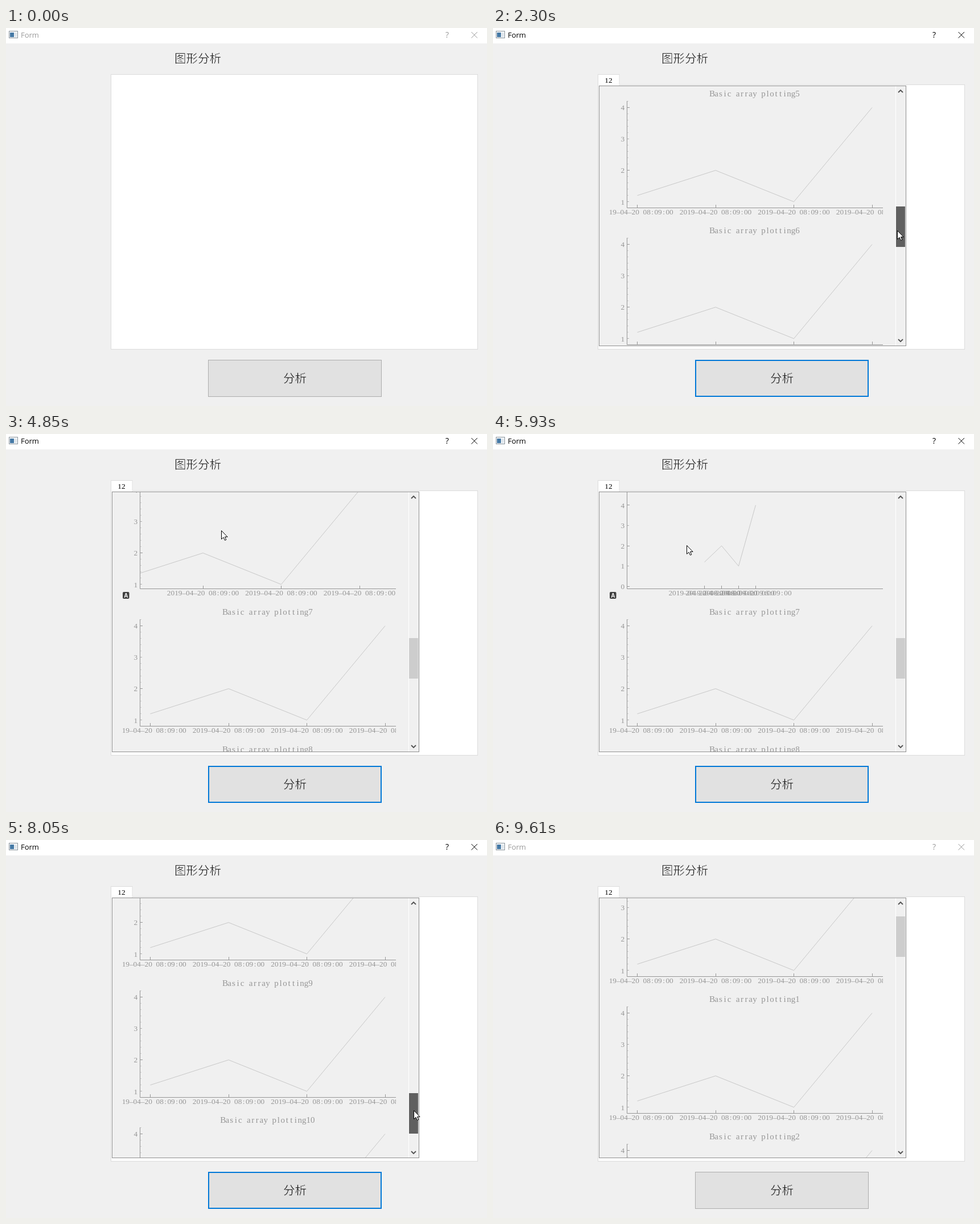
Write an HTML page with a canvas that moves like this. It is 845x663 px and loops after 9.68 s.

```html
<!DOCTYPE html>
<html lang="zh">
<head>
<meta charset="utf-8">
<title>Form</title>
<style>
html, body { margin: 0; width: 100%; height: 100%; overflow: hidden; background: #f0f0f0; }
canvas { display: block; width: 845px; height: 663px; }
</style>
</head>
<body>
<canvas id="stage" width="845" height="663"></canvas>
<script>
const ctx = document.getElementById('stage').getContext('2d');
const LOOP = 9680, STEP = 77;
const GRAY = '#969696', BACK = '#f0f0f0';
const SERIF = '"Liberation Serif", serif';
const SANS = '"Open Sans", "Noto Sans", sans-serif';
const CJK = '300 20.5px "Noto Sans CJK SC", "Noto Sans CJK", sans-serif';

// Where the mouse comes to rest or turns: time, x, y
const STOPS = [
  [120, 566, 660], [500, 540, 618], [930, 540, 618], [1770, 710, 164],
  [1850, 710, 164], [2310, 710, 355], [2690, 710, 400], [3180, 577, 202],
  [3542, 566, 276], [4300, 532, 205], [4620, 342, 165], [5090, 417, 173],
  [5929, 340, 195], [6170, 383, 190], [7260, 376, 205], [7830, 716, 388],
  [8008, 716, 474], [8200, 722, 497], [8600, 729, 164.4], [8885, 737, 664]
];

// Spans of time with a mouse button held
const SCROLL_DOWN = [1850, 2690], SCROLL_UP = [7830, 8600];
const PAN = [3180, 4300], ZOOM = [5090, 7260];

const DATA = [1.2, 2, 1, 4];
const STAMP = '2019–04–20 08:09:00';
const X0 = 253.5, DX = 137.5, UNIT = 55.1;

function pointer(t) {
  const i = STOPS.findIndex(s => s[0] > t);
  if (i === 0) return STOPS[0].slice(1);
  if (i < 0) return STOPS[STOPS.length - 1].slice(1);
  const [ta, xa, ya] = STOPS[i - 1], [tb, xb, yb] = STOPS[i];
  const u = (1 - Math.cos(Math.PI * (t - ta) / (tb - ta))) / 2;
  return [xa + (xb - xa) * u, ya + (yb - ya) * u];
}

// Distance the mouse has been dragged within a span
function drag([from, to], t) {
  const a = pointer(from);
  const b = pointer(Math.min(Math.max(t, from), to));
  return [b[0] - a[0], b[1] - a[1]];
}

const within = ([from, to], t) => t >= from - STEP && t < to + STEP;

// The dragged plot: pan by the distance, then scale about the grab point
function viewAt(t, y4) {
  const [px, py] = drag(PAN, t), [zx, zy] = drag(ZOOM, t);
  const [cx, cy] = pointer(ZOOM[0]);
  const sx = 1.02 ** zx, sy = 1.02 ** -zy;
  return {
    x0: cx + (X0 + px - cx) * sx, dx: DX * sx,
    y4: cy + (y4 + py - cy) * sy, unit: UNIT * sy
  };
}

function fill(x, y, w, h, color) {
  ctx.fillStyle = color;
  ctx.fillRect(x, y, w, h);
}

function path(points, color, width = 1) {
  ctx.strokeStyle = color;
  ctx.lineWidth = width;
  ctx.beginPath();
  points.forEach(([x, y]) => ctx.lineTo(x, y));
  ctx.stroke();
}

function frame(x, y, w, h, back, border, width = 1) {
  fill(x, y, w, h, back);
  ctx.strokeStyle = border;
  ctx.lineWidth = width;
  ctx.strokeRect(x + width / 2, y + width / 2, w - width, h - width);
}

function clip(x, y, w, h) {
  ctx.save();
  ctx.beginPath();
  ctx.rect(x, y, w, h);
  ctx.clip();
}

function label(str, x, y, font, color, align = 'left') {
  ctx.font = font;
  ctx.fillStyle = color;
  ctx.textAlign = align;
  ctx.fillText(str, x, y);
}

// Chinese text, thinned by an outline in the colour behind it
function thin(str, x, y, back) {
  label(str, x, y, CJK, '#000');
  ctx.strokeStyle = back;
  ctx.lineWidth = 0.6;
  ctx.strokeText(str, x, y);
}

// Half-em monospaced text, centred on x and y
function mono(str, x, y, size, color) {
  const cell = size / 2;
  const left = x - (str.length - 1) * cell / 2;
  [...str].forEach((c, i) =>
    label(c, left + i * cell, y + size * 0.32, size + 'px ' + SERIF, color, 'center'));
}

function drawTitleBar(active) {
  const ink = active ? '#000' : '#999';
  fill(0, 0, 845, 27, '#fff');
  frame(5, 5, 16, 13, '#f4f6f8', '#8a949c');
  fill(7, 8, 7, 8, '#4579a5');
  fill(15, 8, 4, 8, '#dfe6ec');
  label('Form', 26, 17, '13px ' + SANS, ink);
  label('?', 775, 17, '14px ' + SANS, ink, 'center');
  path([[817.5, 7], [828, 17.5]], ink);
  path([[828, 7], [817.5, 17.5]], ink);
}

function drawButton(t, active, x, y) {
  const over = t >= 120 && t < 8800 && x > 355 && x < 660 && y > 583 && y < 647;
  let look = ['#e1e1e1', '#adadad', 1];
  if (active) look = ['#e1e1e1', '#0078d7', 2];
  if (over) look = ['#e5f1fb', '#0078d7', active ? 2 : 1];
  if (t >= 350 && t < 500) look = ['#cce4f7', '#005499', 1];
  frame(355, 582, 305, 65, ...look);
  thin('分析', 487, 622, look[0]);
}

function drawPlot(i, top, { x0, dx, y4, unit }) {
  const roof = top + 13, floor = top + 200;
  const yOf = v => y4 + (4 - v) * unit;
  const snap = v => Math.floor(v) + 0.5;

  mono('Basic array plotting' + i, 460, top, 15, GRAY);
  path([[235.5, roof], [235.5, floor + 0.5], [685, floor + 0.5]], GRAY);

  const per = unit > 48 ? 5 : 1;
  for (let k = -4 * per; k <= 8 * per; k++) {
    const v = k / per, y = yOf(v);
    if (y < roof || y > floor) continue;
    const whole = k % per === 0, even = whole && v % 2 === 0;
    path([[236, snap(y)], [even ? 240 : whole ? 239 : 238, snap(y)]],
      even ? GRAY : whole ? '#b2b2b2' : '#cdcdcd');
    if (whole) mono(String(v), 227.7, y + 0.5, 13.3, GRAY);
  }

  clip(204, top - 12, 481, 240);
  DATA.forEach((_, k) => {
    const x = x0 + k * dx;
    if (x < 235 || x > 685) return;
    path([[snap(x), floor], [snap(x), floor - 5]], GRAY);
    mono(STAMP, x, top + 208, 13.3, GRAY);
  });
  ctx.restore();

  clip(236, roof, 449, floor - roof);
  path(DATA.map((v, k) => [x0 + k * dx, yOf(v)]), '#c8c8c8');
  ctx.restore();
}

function drawAutoButton(y) {
  ctx.fillStyle = '#404040';
  ctx.beginPath();
  ctx.roundRect(205, y - 6, 11.5, 12, 2);
  ctx.fill();
  label('A', 210.8, y + 4, 'bold 10px "Liberation Sans", sans-serif', '#fff', 'center');
}

function thumbColor(t, x, y, top) {
  if (within(SCROLL_DOWN, t) || within(SCROLL_UP, t)) return '#606060';
  if (t > SCROLL_UP[1]) return t < 9050 ? '#a6a6a6' : t < 9200 ? '#bababa' : '#cdcdcd';
  return x >= 708 && x < 724 && y >= top && y < top + 71 ? '#a6a6a6' : '#cdcdcd';
}

function drawScrollBar(color, thumb) {
  fill(707, 102, 1, 455, '#fff');
  fill(708, Math.round(thumb), 16, 71, color);
  path([[712, 113], [716, 109], [720, 113]], '#505050', 1.8);
  path([[712, 546], [716, 550], [720, 546]], '#505050', 1.8);
}

function drawArea(t, x, y) {
  const travel = Math.min(345, drag(SCROLL_DOWN, t)[1] + drag(SCROLL_UP, t)[1]);
  frame(184, 99, 645, 465, '#fff', '#dcdcdc');
  frame(184, 81, 38.5, 20, '#fff', '#dcdcdc');
  fill(185, 98, 36.5, 4, '#fff');
  mono('12', 203, 91.5, 13.3, '#000');

  frame(186, 101, 540, 457, BACK, '#8f8f8f');
  clip(187, 102, 538, 455);
  for (let i = 0; i < 11; i++) {
    const top = Math.round(117 + i * 240.6 - travel * 6.31);
    if (top < -130 || top > 570) continue;
    const y4 = top + 24.5;
    drawPlot(i, top, i === 6 ? viewAt(t, y4) : { x0: X0, dx: DX, y4, unit: UNIT });
    const over = x > 187 && x < 707 && y > top - 13 && y < top + 228;
    if (i === 6 && over && t > PAN[0]) drawAutoButton(top + 212);
  }
  const thumb = 122 + travel;
  drawScrollBar(thumbColor(t, x, y, thumb), thumb);
  ctx.restore();
}

function drawPointer(x, y) {
  const shape = [[0, 0], [0, 15], [3.5, 11.8], [6, 17], [8.3, 16], [6, 11], [10.6, 11]];
  ctx.beginPath();
  shape.forEach(([a, b]) => ctx.lineTo(Math.round(x) + a + 0.5, Math.round(y) + b + 0.5));
  ctx.closePath();
  ctx.fillStyle = '#fff';
  ctx.fill();
  ctx.strokeStyle = '#000';
  ctx.lineWidth = 1;
  ctx.stroke();
}

function draw(now) {
  const t = now % LOOP;
  const shown = Math.floor((t + 15) / STEP) * STEP; // the screen refreshes in steps
  const [x, y] = pointer(shown);
  const active = t >= 350 && t < 9610;

  fill(0, 0, 845, 663, BACK);
  drawTitleBar(active);
  thin('图形分析', 296, 61, BACK);
  if (t < 820) frame(184, 81, 645, 483, '#fff', '#dcdcdc');
  else drawArea(shown, x, y);
  drawButton(t, active, x, y);
  if (t >= 120 && t < 8890) drawPointer(x, y);
}

const start = performance.now();
function tick() {
  draw(performance.now() - start);
  requestAnimationFrame(tick);
}
tick();
</script>
</body>
</html>
```
